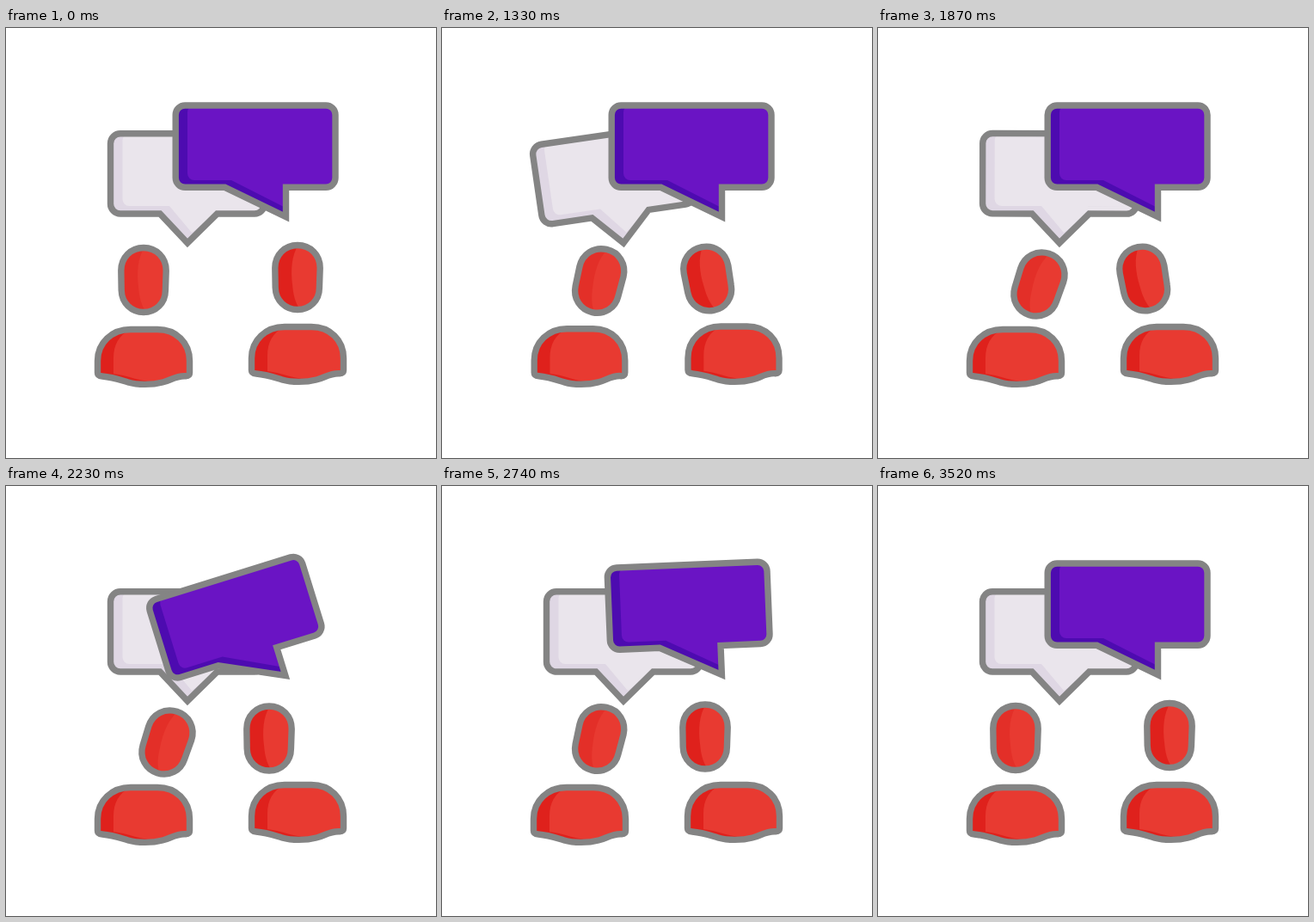
Write an HTML page that moves like this. It is 500 px wide and 500 px high and loops after 3550 ms.

```html
<!DOCTYPE html>
<html lang="en">
<head>
<meta charset="utf-8">
<title>Conversation</title>
<style>
  html, body { margin: 0; width: 100%; height: 100%; overflow: hidden; background: #fff; }
  svg { display: block; width: 100vw; height: 100vh; }
  .line { fill: none; stroke: #848484; stroke-width: 7.4; }
  .pale { fill: #eae5ec; } .paleShade { fill: #dfd7e4; }
  .violet { fill: #6a14c4; } .violetShade { fill: #4d0bb0; }
  .red { fill: #e83a31; } .redMid { fill: #e32f28; } .redShade { fill: #df211c; }
</style>
</head>
<body>
<svg id="stage" viewBox="0 0 500 500"></svg>
<script>
const LOOP = 3550, HOLD = 1000, STEP = 30;
const stage = document.getElementById("stage");

// A group of base shape, lit area and outline; returns a function that places it
function part(shape, light, base, lit) {
  const g = document.createElementNS("http://www.w3.org/2000/svg", "g");
  g.innerHTML = `<path class="${base}" d="${shape}"/><path class="${lit}" d="${light}"/><path class="line" d="${shape}"/>`;
  stage.append(g);
  return value => g.setAttribute("transform", value);
}

// Rounded box whose bottom edge carries a tail
function bubble(l, t, r, b, round, from, tip, to) {
  const arc = (x, y) => `A${round} ${round} 0 0 1 ${x} ${y}`;
  return `M${l + round} ${t}H${r - round}${arc(r, t + round)}V${b - round}${arc(r - round, b)}` +
    `H${from}L${tip}L${to} ${b}H${l + round}${arc(l, b - round)}V${t + round}${arc(l + round, t)}Z`;
}

const HEAD = "M0 -37.5C15 -37.5 26.2 -26 26.2 -11L25.4 12C25.4 27 14 37.5 0 37.5C-14 37.5 -25.4 27 -25.8 12L-26.2 -11C-26.2 -26 -15 -37.5 0 -37.5Z";
const HEAD_LIT = "M1 -37.5C15 -37.5 26.2 -26 26.2 -11L25.4 12C25.4 27 14 37.5 3 37.5C-3 29 -5 20 -6 8C-8 -8 -7 -26 1 -37.5Z";
const TORSO = "M-53.5 -16V-30C-53.5 -51 -37 -66.5 -15 -66.5H16C38 -66.5 53.5 -51 53.5 -30V-16Q53.5 -12.5 49 -12.2C38 -13 31 -7 22 -5C10 -1.800 -7 -1.800 -18 -5C-28 -8 -36 -11 -48 -12Q-53.5 -12.5 -53.5 -16Z";
const TORSO_LIT = "M-15 -66.5H16C38 -66.5 53.5 -51 53.5 -30V-16L49 -12.2C38 -13 31 -7 22 -5L4 -6.5C-10 -8 -18 -13 -35 -15V-33C-35 -48 -29 -60 -15 -66.5Z";

const paleBubble = part(
  bubble(121.5, 122.7, 300.5, 216, 11.5, 245.5, "211 250", 179),
  bubble(135.5, 122.7, 300.5, 207, 8, 244, "216 238", 190) + "M216 207H300L290 216H244L216 238Z",
  "paleShade", "pale");
const violetBubble = part(
  bubble(197.2, 90, 383, 185.3, 11, 325.5, "325.5 219.5", 254.5),
  bubble(211, 90, 383, 177, 8, 325, "325 209", 262) + "M325 170H383V175L373 185H325Z",
  "violetShade", "violet");
const leftHead = part(HEAD, HEAD_LIT, "redMid", "red");
const rightHead = part(HEAD, HEAD_LIT, "redShade", "red");
const leftTorso = part(TORSO, TORSO_LIT, "redShade", "red");
const rightTorso = part(TORSO, TORSO_LIT, "redShade", "red");

// Smooth 0 to 1 between steps a and b
function ramp(n, a, b) {
  const x = Math.min(1, Math.max(0, (n - a) / (b - a)));
  return (1 - Math.cos(Math.PI * x)) / 2;
}
const between = (n, a, b, c, d) => ramp(n, a, b) - ramp(n, c, d);

// Dying swing: [step, angle] of each turning point
const TURNS = [[0, 0], [6.6, -20], [17.8, 15], [24.4, -9.5], [32, 5], [40, 0]];
const swing = n => TURNS.slice(1).reduce((angle, [at, to], i) =>
  angle + (to - TURNS[i][1]) * ramp(n, TURNS[i][0], at), 0);

// Wide squash, then a quarter of it as a stretch
function squash(n) {
  if (n < 0 || n > 14) return 0;
  return Math.sin(Math.PI * n / 7) ** 2 * (n < 7 ? 1 : -0.25);
}

const pose = (x, y, turn) => `translate(${x} ${y}) rotate(${turn})`;

function torso(x, y, amount) {
  const k = amount * 0.055;
  return `translate(${x} ${y}) scale(${1 + k} ${1 - k})`;
}

function draw(time) {
  const n = Math.max(0, Math.floor((time % LOOP - HOLD) / STEP));

  paleBubble(`rotate(${swing(n)} 211 250)`);
  violetBubble(`rotate(${swing(n - 36)} 328 222)`);

  const leanL = between(n, 0, 10, 69, 80), bow = between(n, 15, 24, 46, 54);
  leftHead(pose(160 + 23 * leanL + 4.3 * bow, 293 + leanL + 4 * bow, 13 * leanL + 5 * bow));

  const leanR = between(n, 2, 10, 62, 73), tilt = between(n, 2, 10, 35, 41), nod = between(n, 35, 41, 48, 55);
  rightHead(pose(339 - 33 * leanR + 3 * tilt, 290 + 1.5 * leanR + 2 * nod, -10.5 * tilt));

  leftTorso(torso(160, 417, squash(n) + squash(n - 15) + squash(n - 69)));
  rightTorso(torso(339, 414, squash(n - 2) + squash(n - 60)));
}

const begin = performance.now();
function tick() {
  draw(performance.now() - begin);
  requestAnimationFrame(tick);
}
draw(0);
requestAnimationFrame(tick);
</script>
</body>
</html>
```
